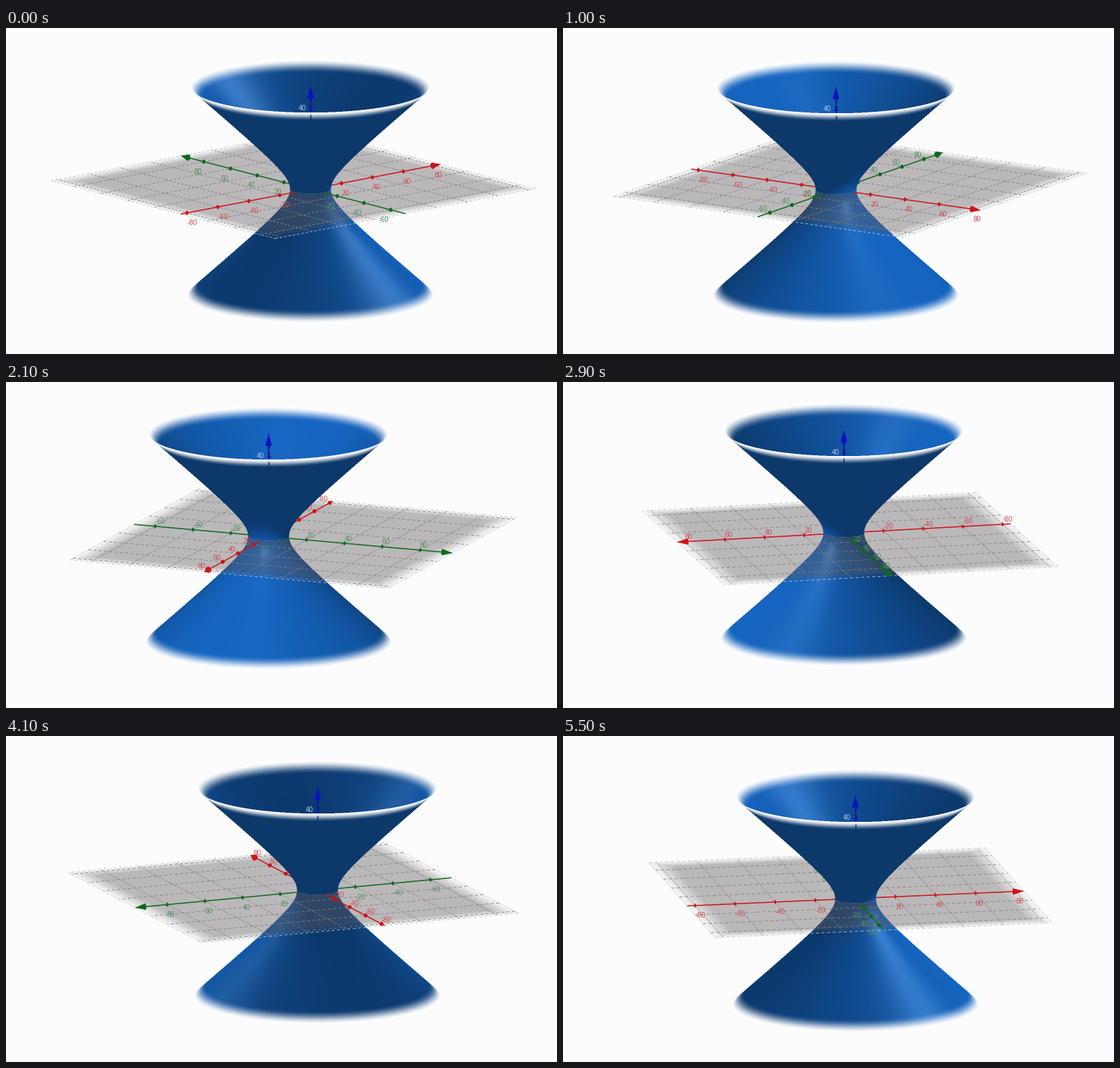
Recreate the animation shown at these times as a matplotlib script. Size 789x467 px, loop 5600 ms.

```python
import numpy as np
import matplotlib.pyplot as plt
from matplotlib.animation import FuncAnimation
from matplotlib.collections import LineCollection, PolyCollection

W, H, DPI = 789, 467, 100
PT = 72 / DPI
FRAMES, STEP = 56, 100
K = 2.924                      # pixels per unit
S = 0.2225                     # sine of the camera elevation
C = np.sqrt(1 - S * S)
PIVOT = np.array([411.3, 224.5])
Y_MID, HALF = 13, 84           # floor centre (0, Y_MID) and half side
Z_TOP, Z_LOW, FADE = 52.0, -53.6, 5.6
M = 1.25                       # x^2 + y^2 = 100 + M z^2

BLUE = np.array([21, 101, 192], np.float32) / 255
RED, GREEN, NAVY = "#cc1418", "#0e6a1c", "#0a12c4"
RED_TXT, GREEN_TXT, NAVY_TXT = "#cd4f50", "#4c9459", "#a9c4f2"
FLOOR = (97, 92, 95)

TURN_AT = [0, 10, 21, 29, 36, 41, 47, 48, 55]
TURN = [40.8, -32.6, -112, -166.2, -212.8, -247, -292.3, -301, -348.8]

# screen box of the surface, relative to the moving centre
LEFT, RIGHT, UP, DOWN = -184, 184, -196, 202
# screen box of the floor
FX0, FX1, FY0, FY1 = 60, 763, 145, 305
SS = 2


def smooth(t):
    t = np.clip(t, 0, 1)
    return t * t * (3 - 2 * t)


def trace_surface():
    """Nearest hit of each view ray with the hyperboloid."""
    px = np.arange(LEFT, RIGHT, 1 / SS) + 0.5 / SS
    py = np.arange(UP, DOWN, 1 / SS) + 0.5 / SS
    u, v = np.meshgrid(px / K, -py / K)
    a = C * C - M * S * S
    b = -2 * v * S * C * (1 + M)
    c = u**2 + (v * S) ** 2 - 100 - M * (v * C) ** 2
    disc = b * b - 4 * a * c
    root = np.sqrt(np.maximum(disc, 0))
    near, far = (-b + root) / (2 * a), (-b - root) / (2 * a)

    def inside(t):
        z = v * C + t * S
        return (disc >= 0) & (z > Z_LOW) & (z < Z_TOP)

    t = np.where(inside(near), near, far)
    hit = inside(near) | inside(far)
    y, z = v * S - t * C, v * C + t * S
    n = np.stack([u, y, -M * z], axis=-1)
    n /= np.linalg.norm(n, axis=-1, keepdims=True) + 1e-9
    n *= np.where(-C * n[..., 1] + S * n[..., 2] < 0, -1, 1)[..., None]
    solid = smooth((Z_TOP - z) / FADE) * smooth((z - Z_LOW) / FADE)
    return hit, z > 0, np.dstack([n, solid])


class Sheet:
    """One half of the surface, reduced to the pixels it covers."""

    def __init__(self, mask, data):
        m = mask[..., None].astype(float)
        full = np.concatenate([data * m, m], axis=2)
        h, w = mask.shape[0] // SS, mask.shape[1] // SS
        cell = full.reshape(h, SS, w, SS, 5).mean(axis=(1, 3))
        # widen colours by a pixel so that the edges blend cleanly
        wide = sum(np.roll(cell, (i, j), (0, 1)) for i in (-1, 0, 1) for j in (-1, 0, 1))
        both = np.where(cell[..., 4:] > 0, cell, wide)
        self.used = both[..., 4] > 0
        part = both[self.used]
        part = (part[:, :4] / part[:, 4:]).astype(np.float32)
        n = part[:, :3]
        self.normal = n / (np.linalg.norm(n, axis=1, keepdims=True) + 1e-6)
        self.solid = part[:, 3:]
        self.img = np.full((h, w, 4), 255, np.uint8)
        self.img[..., 3] = np.round(255 * cell[..., 4])

    def shade(self, turn):
        """Colours under a light that turns with the scene."""
        r = np.sqrt(0.5)
        light = np.array([r * np.cos(turn), r * np.sin(turn), r], np.float32)
        eye = np.array([0, -C, S], np.float32)
        dot = self.normal @ light
        lit = np.maximum(dot, 0)
        spec = np.maximum(2 * lit * (self.normal @ eye) - light @ eye, 0) * (dot > 0)
        spec *= spec
        p4 = spec * spec
        shine = 0.16 * p4 * p4 * p4 * spec
        rgb = (0.55 + 0.45 * lit)[:, None] * BLUE + shine[:, None]
        rgb = 1 + (np.minimum(rgb, 1) - 1) * self.solid
        self.img[self.used, :3] = (255 * rgb + 0.5).astype(np.uint8)
        return self.img


hit, above, data = trace_surface()
LOWER, UPPER = Sheet(hit & ~above, data), Sheet(hit & above, data)
GX = np.arange(FX0, FX1, dtype=np.float32)[None, :] + 0.5
GY = np.arange(FY0, FY1, dtype=np.float32)[:, None] + 0.5
FLOOR_IMG = np.zeros((FY1 - FY0, FX1 - FX0, 4), np.uint8)
FLOOR_IMG[..., :3] = FLOOR


class View:
    def __init__(self, turn):
        self.cos, self.sin = float(np.cos(turn)), float(np.sin(turn))
        self.origin = PIVOT + self.vec(0, -Y_MID, 0)

    def vec(self, x, y, z):
        sx = x * self.cos - y * self.sin
        sy = x * self.sin + y * self.cos
        return np.stack([K * sx, -K * (S * sy + C * z)], axis=-1)

    def at(self, x, y, z):
        return self.origin + self.vec(x, y, z)


def floor_image(view):
    a = (GX - PIVOT[0]) / K
    b = -(GY - PIVOT[1]) / (K * S)
    x, y = a * view.cos + b * view.sin, b * view.cos - a * view.sin
    edge = HALF - np.maximum(np.abs(x), np.abs(y))
    FLOOR_IMG[..., 3] = 107 * np.clip((edge + 0.5) / 11, 0, 1)
    return FLOOR_IMG


def line(p, q, color, width, z, style="-"):
    ax.add_collection(LineCollection([(p, q)], colors=color, linewidths=width * PT,
                                     linestyles=[style], zorder=z), autolim=False)


def polys(shapes, color, width, z):
    ax.add_collection(PolyCollection(shapes, facecolors=color, edgecolors=color,
                                     linewidths=width, zorder=z), autolim=False)


def grid(view):
    lo, hi = Y_MID - HALF, Y_MID + HALF
    for along_x in (True, False):
        unit = np.hypot(*view.vec(*((1, 0, 0) if along_x else (0, 1, 0))))
        if along_x:
            marks, ends = [lo, *range(-60, 81, 20), hi], (-HALF, HALF)
        else:
            marks, ends = [-HALF, *range(-80, 81, 20), HALF], (lo, hi)
        rows = [[view.at(e, m, 0) if along_x else view.at(m, e, 0) for e in ends]
                for m in marks]
        tones = ["#b9c6d2"] + ["#807f85"] * (len(marks) - 2) + ["#b9c6d2"]
        ax.add_collection(LineCollection(
            rows, colors=tones, linewidths=0.9 * PT, zorder=3,
            linestyles=[(0, (1.7 * unit, 1.4 * unit))]), autolim=False)


def disc(view, axis, pos, radius):
    t = np.linspace(0, 2 * np.pi, 21)
    a, b, flat = radius * np.cos(t), radius * np.sin(t), np.full(21, float(pos))
    return view.at(*{"x": (flat, a, b), "y": (a, flat, b), "z": (a, b, flat)}[axis])


def arrow(view, axis, tip, length, radius, color, z):
    base = disc(view, axis, tip - length, radius)
    point = disc(view, axis, tip, 0)[0]
    d = point - base[:-1].mean(axis=0)
    side = (base - point) @ np.array([-d[1], d[0]])
    tri = np.array([point, base[side.argmin()], base[side.argmax()]])
    polys([base, tri], color, 0.3, z)


def label(pos, text, color, align, z):
    ax.text(pos[0], pos[1], text, color=color, ha=align, va="center_baseline",
            fontsize=10 * PT, family="Liberation Sans", zorder=z)


def floor_axis(view, axis, lo, hi, first, color, txt, hand):
    def spot(s):
        return view.at(s, 0, 0) if axis == "x" else view.at(0, s, 0)

    line(spot(lo), spot(hi - 4), color, 1.5, 4)
    arrow(view, axis, hi, 5.2, 1.45, color, 4)
    d = spot(1) - spot(0)
    nx, ny = hand * np.array([-d[1], d[0]]) / np.hypot(*d)
    align, dx = ("left", 0) if nx > -0.2 else ("right", -3)
    stops = [s for s in range(first, 81, 20) if s]
    polys([disc(view, axis, s, 0.75) for s in stops], color, 1.1, 4)
    for s in stops:
        label(spot(s) + [dx, 10.5 * ny + 3], str(s), txt, align, 5)


def height_axis(view):
    x, y = view.origin
    line((x, y - 134), (x, y - 110), NAVY, 1.6, 8)
    line((x, y - 131), (x, y - 113), "#0a1f8c", 3.2, 8, (0, (1.6, 1.6)))
    line((x, y - 107), (x, y - 100), "#0a2478", 1.4, 8)
    arrow(view, "z", 51.5, 5.6, 1.5, NAVY, 9)
    polys([disc(view, "z", 40, 0.8)], NAVY, 1, 9)
    label((x - 6.5, y - 116.5), "40", NAVY_TXT, "right", 9)


fig = plt.figure(figsize=(W / DPI, H / DPI), dpi=DPI, facecolor="#fcfcfc")
ax = fig.add_axes([0, 0, 1, 1])
ax.axis("off")


def picture(img, box, mode, z):
    return ax.imshow(img, extent=box, interpolation=mode, aspect="auto", zorder=z)


low_pic = picture(LOWER.img, (LEFT, RIGHT, DOWN, UP), "bilinear", 1)
floor_pic = picture(FLOOR_IMG, (FX0, FX1, FY1, FY0), "nearest", 2)
up_pic = picture(UPPER.img, (LEFT, RIGHT, DOWN, UP), "bilinear", 6)
ax.set_xlim(0, W)
ax.set_ylim(H, 0)
ax.autoscale(False)


def draw(n):
    for old in [*ax.collections, *ax.texts]:
        old.remove()
    turn = np.radians(np.interp(n, TURN_AT, TURN))
    view = View(turn)
    x, y = view.origin
    for pic, sheet in ((low_pic, LOWER), (up_pic, UPPER)):
        pic.set_data(sheet.shade(turn))
        pic.set_extent((x + LEFT, x + RIGHT, y + DOWN, y + UP))
    floor_pic.set_data(floor_image(view))
    grid(view)
    floor_axis(view, "x", -84, 84, -80, RED, RED_TXT, 1)
    floor_axis(view, "y", -71, 97, -60, GREEN, GREEN_TXT, -1)
    height_axis(view)
    return []


anim = FuncAnimation(fig, draw, frames=FRAMES, interval=STEP, init_func=lambda: [],
                     repeat=True, repeat_delay=0, blit=False)
plt.show()
```
